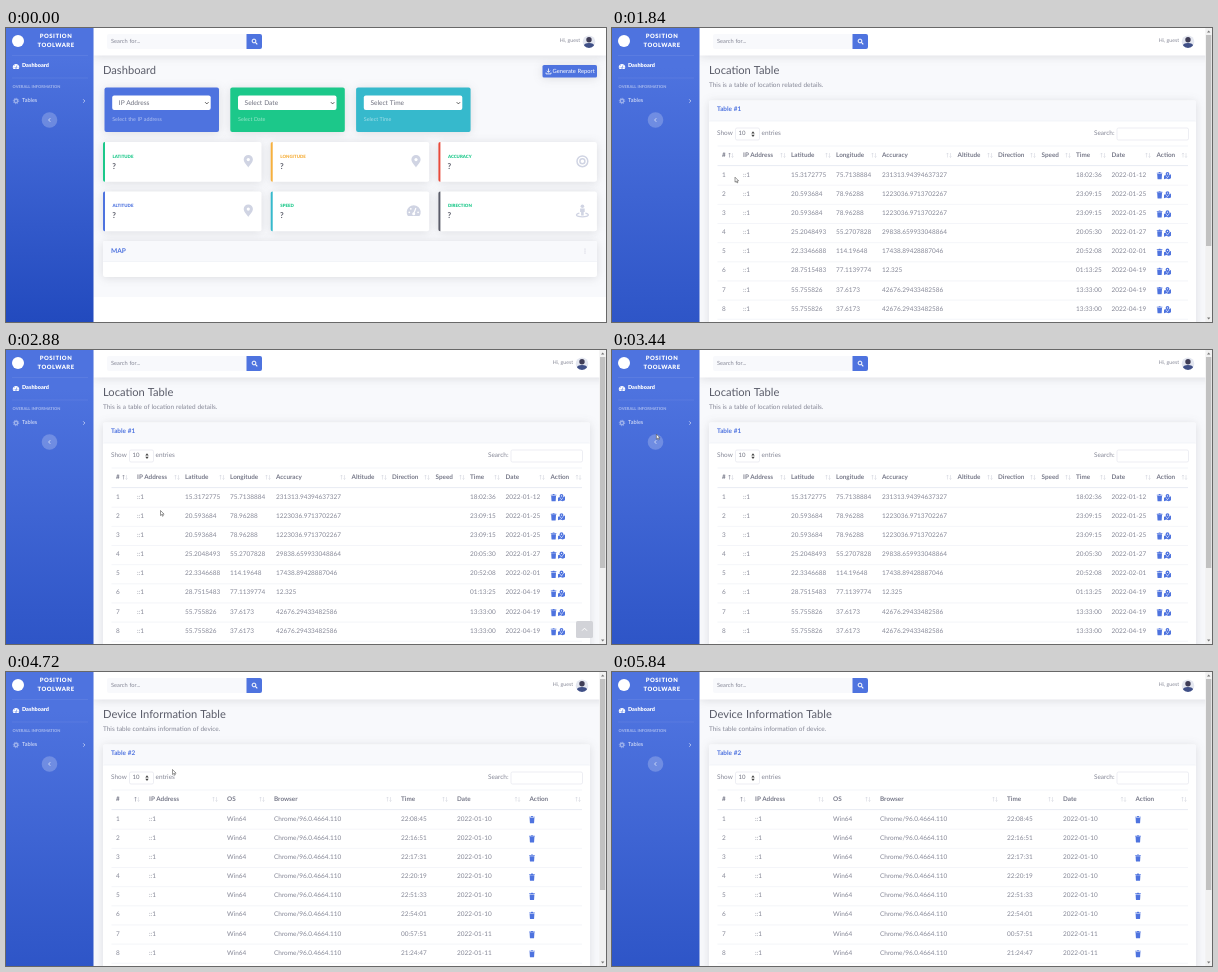
Recreate the animation shown at these times as an HTML page. Size 600 px wide and 294 px high, loop 6.32 s.

```html
<!DOCTYPE html>
<html lang="en">
<head>
<meta charset="utf-8">
<title>Dashboard walkthrough</title>
<style>
html, body { margin: 0; height: 100%; overflow: hidden; background: #f8f9fc; }
#stage { display: block; width: 100vw; height: 100vh; }
text { font-family: Lato, "Open Sans", sans-serif; dominant-baseline: central; word-spacing: .04em; white-space: pre; text-rendering: geometricPrecision; }
.b { font-weight: 700; }
.x { font-weight: 900; }
.card { filter: drop-shadow(0 1px 5px rgba(58, 59, 69, .15)); }
</style>
</head>
<body>
<svg id="stage" viewBox="0 0 600 294"></svg>
<script>
const BLUE = '#4e73df', GREEN = '#1cc88a', CYAN = '#36b9cc', ORANGE = '#f6b03e', RED = '#e74a3b';
const GREY = '#858796', DARK = '#5a5c69', LINE = '#e6e9f2', ICON = '#d0d4e3', PALE = '#f8f9fc';
const LOOP = 6320, STEP = 80, PAGE_H = 390, VIEW_H = 294, SIDE_W = 87.5;

// Drawing helpers
const text = (x, y, s, size = 6.45, fill = GREY, more = '') =>
  `<text x="${x}" y="${y}" dy="-.08em" font-size="${size}" fill="${fill}" ${more}>${s}</text>`;
const bold = (x, y, s, size, fill, more = '') => text(x, y, s, size, fill, 'class="b" ' + more);
const black = (x, y, s, size, fill, more = '') => text(x, y, s, size, fill, 'class="x" ' + more);
const rect = (x, y, w, h, fill, r = 0, more = '') =>
  `<rect x="${x}" y="${y}" width="${w}" height="${h}" fill="${fill}" rx="${r}" ${more}/>`;
const card = (x, y, w, h, fill = '#fff') => rect(x, y, w, h, fill, 2, 'class="card"');
const field = (x, y, w, h) => rect(x, y, w, h, '#fff', 1.5, 'stroke="#d6d8e5" stroke-width=".45"');
const hline = (x1, x2, y, color = LINE, w = .45) =>
  `<path d="M${x1} ${y}H${x2}" stroke="${color}" stroke-width="${w}"/>`;
const stroke = (d, color, w = .9) => `<path d="${d}" fill="none" stroke="${color}" stroke-width="${w}"/>`;
const at = (x, y, body, scale = 1) => `<g transform="translate(${x} ${y}) scale(${scale})">${body}</g>`;
const caret = (x, y, color = '#444', w = .9) => stroke(`M${x - 1.7} ${y - .8}l1.7 1.7l1.7-1.7`, color, w);

// Icons, centred on 0,0
const pin = (c, hole) => `<path fill="${c}" d="M0 6.3C-1.2 4-4.6 1.2-4.6-1.7a4.6 4.6 0 0 1 9.2 0C4.6 1.2 1.2 4 0 6.3z"/><circle cy="-1.7" r="1.6" fill="${hole}"/>`;
const target = `<g fill="none" stroke="${ICON}" stroke-width="1.5"><circle r="5.4"/><circle r="2.5"/></g>`;
const gauge = (c, hole) => `<path fill="${c}" d="M-5.8 5.3A7 7 0 1 1 5.8 5.3z"/>` +
  stroke('M0 3L2.2-2.8', hole, 1.2) + `<g fill="${hole}"><circle cy="3" r="1.5"/><circle cx="-4.4" cy="1.5" r=".9"/><circle cx="4.4" cy="1.5" r=".9"/><circle cx="-2.9" cy="-2" r=".9"/></g>`;
const person = `<g fill="${ICON}"><circle cy="-4.6" r="1.8"/><path d="M-2.3-2.2h4.6v3.4h-1v3.4h-2.6v-3.4h-1z"/></g>` +
  stroke('M-3 2.4C-8 3.5-6.5 6 0 6S8 3.5 3 2.4', ICON, 1.2);
const trash = `<path fill="${BLUE}" d="M-2.8-3h1.7l.4-.6h1.4l.4.6h1.7v.8h-5.6zM-2.4-1.8h4.8l-.3 4.9q0 .5-.6.5h-3q-.6 0-.6-.5z"/>`;
const mapMark = `<path fill="${BLUE}" d="M-3.5 0l1.6-.7 1 1.7.9 1.2.9-1.2 1-1.7 1.6-.7v4l-2.3.9-2.3-.8-2.4.8z"/>` +
  `<path fill="${BLUE}" d="M0 1.5Q-1.9-.7-1.9-1.8a1.9 1.9 0 0 1 3.8 0Q1.9-.7 0 1.5z"/><circle cy="-1.8" r=".6" fill="#fff"/>`;

function sidebar() {
  const rule = y => hline(6, 82, y, 'rgba(255,255,255,.15)');
  return rect(0, 0, SIDE_W, VIEW_H, 'url(#blue)', 0, 'id="side"') +
    '<circle cx="12" cy="13" r="6" fill="#fff"/>' +
    ['POSITION', 'TOOLWARE'].map((s, i) =>
      black(50, 8.8 + 9.6 * i, s, 5.9, '#fff', 'text-anchor="middle" letter-spacing=".5"')).join('') +
    rule(27.5) + at(10, 38.6, gauge('#fff', BLUE), .45) + black(16, 38.8, 'Dashboard', 5.5, '#fff') + rule(50) +
    black(6.5, 59, 'OVERALL INFORMATION', 4, 'rgba(255,255,255,.45)') +
    '<g id="gear" fill="none" stroke="#fff"><circle cx="10" cy="73" r="1.7" stroke-width="1.4"/><circle cx="10" cy="73" r="2.7" stroke-width="1" stroke-dasharray="1.06"/></g>' +
    text(16, 73.4, 'Tables', 5.6, 'rgba(255,255,255,.85)') +
    '<g id="arrow"><path d="M-.8-1.7l1.7 1.7l-1.7 1.7" fill="none" stroke="#fff" stroke-opacity=".7" stroke-width=".8"/></g>' +
    '<svg id="menu" y="84" width="88" height="0">' + rect(6, 0, 75.5, 51, '#fff', 2.2) +
    rect(19, 0, 50, 11, '#eaecf4', 2, 'id="hover"') + black(15.5, 8.6, 'DATA:', 4, '#b7b9cc') +
    ['LOCATION TABLE', 'DEVICE TABLE', 'ERROR TABLE'].map((s, i) =>
      black(25, 16.8 + 11 * i, s, 4.1, '#3a3b45')).join('') + '</svg>' +
    '<g id="toggle"><circle r="7.8" fill="#fff" fill-opacity=".22"/><path d="M.8-1.8l-1.7 1.8l1.7 1.8" fill="none" stroke="#fff" stroke-opacity=".7" stroke-width=".9"/></g>';
}

function topbar() {
  return rect(SIDE_W, 0, 600 - SIDE_W, 27.5, '#fff', 0, 'class="card"') + rect(101, 6, 140, 15, PALE, 2) +
    text(105, 13.7, 'Search for...', 5.7) +
    `<path d="M240.5 6h13.5a2 2 0 0 1 2 2v11a2 2 0 0 1-2 2h-13.5z" fill="${BLUE}"/>` +
    '<circle cx="248" cy="13" r="1.9" fill="none" stroke="#fff"/>' + stroke('M249.4 14.4l1.9 1.9', '#fff', 1.1) +
    '<g id="user">' + text(574, 13.8, 'Hi, guest', 5.2, GREY, 'text-anchor="end"') +
    '<circle cx="583" cy="13.7" r="6.3" fill="#e4e7f0"/><circle cx="583" cy="11.7" r="2.7" fill="#3f3d56"/>' +
    '<path d="M578 17.5q0-2.6 5-2.6t5 2.6a6.3 6.3 0 0 1-10 0z" fill="#3f4f86"/></g>';
}

function dashboard() {
  const picks = [['IP Address', 'Select the IP address', BLUE], ['Select Date', 'Select Date', GREEN], ['Select Time', 'Select Time', CYAN]];
  const marker = pin(ICON, '#fff');
  const infos = [
    ['LATITUDE', GREEN, GREEN, marker], ['LONGITUDE', ORANGE, ORANGE, marker], ['ACCURACY', RED, GREEN, target],
    ['ALTITUDE', BLUE, BLUE, marker], ['SPEED', CYAN, GREEN, gauge(ICON, '#fff')], ['DIRECTION', DARK, GREEN, person]];
  return text(97, 43, 'Dashboard', 11.15, DARK) + rect(536.5, 37, 54.5, 12.5, BLUE, 1.6, 'class="card"') +
    stroke('M542.5 40.5v3.6M540.9 42.7l1.6 1.7l1.6-1.7M540 44.5v1.4h5v-1.4', '#fff', .8) +
    text(546.5, 43.6, 'Generate Report', 5.75, '#fff') +
    picks.map(([label, note, color], i) => at(98.5 + 125.8 * i, 0,
      card(0, 59.5, 114.5, 44.5, color) + rect(7.7, 67.5, 98.5, 14.5, '#fff', 2) +
      text(14.3, 75.2, label, 6.6, '#6e707e') + caret(102.3, 75) +
      text(7.7, 92.6, note, 5.4, 'rgba(255,255,255,.55)'))).join('') +
    infos.map(([label, edge, color, icon], i) => at(97 + 167.7 * (i % 3), i < 3 ? 114 : 163.5,
      card(0, 0, 158.5, 39.8) + `<path d="M2 0h-.2a1.8 1.8 0 0 0-1.8 1.8v36.2a1.8 1.8 0 0 0 1.8 1.8h.2z" fill="${edge}"/>` +
      black(9.5, 14.6, label, 4.4, color) + bold(9.2, 24.2, '?', 8, DARK) +
      at(i % 3 == 2 ? 144 : i == 4 ? 143 : 145.3, 19.3, icon))).join('') +
    card(97, 213, 494, 36) + rect(97, 213, 494, 20.5, PALE, 2) + hline(97, 591, 233.5) +
    bold(105, 223.4, 'MAP', 6.6, BLUE) +
    [221, 223, 225].map(y => `<circle cx="579" cy="${y}" r=".6" fill="#c5c8d6"/>`).join('') +
    rect(SIDE_W, 269, 600 - SIDE_W, 25, '#fff');
}

// cols: [x, title, right edge]; rows: cell strings in column order
function tablePage(title, note, name, cols, rows, tools) {
  const sorter = (x, first) =>
    stroke(`M${x - 1.5} 129.5v-4.5m-1 1.2l1-1.2l1 1.2`, first ? GREY : '#d3d5de', .55) +
    stroke(`M${x + 1.5} 125v4.5m-1-1.2l1 1.2l1-1.2`, '#d3d5de', .55);
  const rowY = i => 147.7 + 19.15 * i;
  return text(97, 43, title, 11.15, DARK) + text(97, 57.8, note) +
    card(97, 72.5, 487, 284) + rect(97, 72.5, 487, 20.5, PALE, 2) + hline(97, 584, 93) +
    bold(105, 82.4, name, 6.4, BLUE) +
    text(105, 106, 'Show') + field(123.5, 100, 24, 12) +
    text(126.5, 106.4, '10', 6, '#6e707e') + '<path d="M139.3 105.5h3.4l-1.7-2.2zM139.3 106.7h3.4l-1.7 2.2z" fill="#444"/>' +
    text(149.5, 106, 'entries') + text(502.5, 106, 'Search:', 6.45, GREY, 'text-anchor="end"') +
    field(505, 100, 71.5, 12) +
    hline(105.5, 576, 118) + hline(105.5, 576, 137.6, LINE, .9) +
    cols.map(([x, s, end], i) => bold(x, 128, s, 6.35, '#777989') + sorter(end, !i)).join('') +
    rows.map((row, i) => row.map((s, c) => text(cols[c][0], rowY(i), s)).join('') +
      tools.map(([x, icon]) => at(x, rowY(i), icon)).join('') + hline(105.5, 576, rowY(i) + 9.5)).join('') +
    text(105, 343, 'Showing 1 to 10 of 20 entries') +
    rect(492, 333.5, 84.5, 15, '#fff', 1.6, 'stroke="#dddfeb" stroke-width=".5"') +
    rect(525.5, 333.5, 13.5, 15, BLUE) +
    text(496.8, 341.2, 'Previous') + text(530.6, 341.2, '1', 6.45, '#fff') +
    text(544, 341.2, '2', 6.45, BLUE) + text(557.3, 341.2, 'Next', 6.45, BLUE) +
    rect(SIDE_W, 376, 600 - SIDE_W, PAGE_H - 376, '#fff');
}

const moscow = ['55.755826', '37.6173', '42676.29433482586', '13:33:00', '2022-04-19'];
const delhi = ['20.593684', '78.96288', '1223036.9713702267', '23:09:15', '2022-01-25'];
const places = [
  ['15.3172775', '75.7138884', '231313.94394637327', '18:02:36', '2022-01-12'], delhi, delhi,
  ['25.2048493', '55.2707828', '29838.659933048864', '20:05:30', '2022-01-27'],
  ['22.3346688', '114.19648', '17438.89428887046', '20:52:08', '2022-02-01'],
  ['28.7515483', '77.1139774', '12.325', '01:13:25', '2022-04-19'], moscow, moscow, moscow, moscow];
const visits = ['22:08:45', '22:16:51', '22:17:31', '22:20:19', '22:51:33', '22:54:01', '00:57:51', '21:24:47', '21:26:10', '21:31:52'];

const locations = tablePage('Location Table', 'This is a table of location related details.', 'Table #1',
  [[110, '#', 119], [131, 'IP Address', 171], [179, 'Latitude', 216], [224, 'Longitude', 262], [270, 'Accuracy', 337],
   [345.5, 'Altitude', 378], [386, 'Direction', 421], [429.5, 'Speed', 456], [464, 'Time', 491], [499.5, 'Date', 536], [544.5, 'Action', 572.5]],
  places.map(([lat, lon, acc, time, date], i) => [i + 1, '::1', lat, lon, acc, '', '', '', time, date]),
  [[547.6, trash], [555.5, mapMark]]);
const devices = tablePage('Device Information Table', 'This table contains information of device.', 'Table #2',
  [[110, '#', 131], [143, 'IP Address', 209], [221, 'OS', 256], [268, 'Browser', 383], [395, 'Time', 439], [451, 'Date', 511.5], [523.5, 'Action', 572]],
  visits.map((time, i) => [i + 1, '::1', 'Win64', 'Chrome/96.0.4664.110', time, i < 6 ? '2022-01-10' : '2022-01-11']),
  [[526, trash]]);

const $ = id => document.getElementById(id);
$('stage').innerHTML =
  `<defs><linearGradient id="blue" x2="0" y2="1"><stop offset=".1" stop-color="${BLUE}"/><stop offset="1" stop-color="#224abe"/></linearGradient></defs>` +
  rect(0, 0, 600, 294, PALE) + '<g id="scroll">' + topbar() +
  [dashboard(), locations, devices].map((p, i) => `<g id="page${i}">${p}</g>`).join('') + sidebar() + '</g>' +
  '<g id="top">' + rect(570, 271, 17, 17, '#d2d3d8', 1.6) + stroke('M576 280.7l2.5-2.5l2.5 2.5', '#fff', 1) + '</g>' +
  '<g id="bar">' + rect(593.3, 0, 6.7, 294, '#f1f1f1') + rect(594, 7, 5.3, 211, '#c1c1c1', 0, 'id="thumb"') +
  '<path d="M595 4.5h3.4l-1.7-2zM595 289.5h3.4l-1.7 2z" fill="#777"/></g>' +
  '<g id="status">' + rect(0, 286.5, 85, 7.5, '#dee1e6', .8) +
  '<text id="link" x="1.5" y="290.3" font-size="4.9" fill="#3c4043" style="font-family:Roboto,sans-serif;word-spacing:0"></text></g>' +
  '<g id="cursor" stroke="#444" stroke-width=".55" fill="#fff" stroke-linejoin="round">' +
  '<path id="pointer" d="M0 0v5l1.2-1l.8 1.8l.8-.4l-.8-1.7h1.6z"/>' +
  '<path id="hand" d="M-.7.4q.7-.9 1.4 0v3l3 .7q.8.3.7 1.2l-.6 3.2h-4l-2.5-3.2q.2-1 1.300-.4l.7.6z"/></g>';

const ramp = (t, a, b) => { const u = Math.min(1, Math.max(0, (t - a) / (b - a))); return u * u * (3 - 2 * u); };
const trail = [
  [720, 180, 130], [960, 24, 70], [1060, 24, 70], [1280, 43, 106.5], [1440, 43, 98], [1600, 43, 98],
  [2000, 166.5, 177], [2480, 166.5, 177], [2840, 154.5, 160.5], [3200, 154.5, 160.5], [3520, 24, 70], [3680, 24, 70],
  [4000, 46, 116], [4320, 46, 116], [4640, 167, 94], [4720, 166.5, 97.5]];

function cursorAt(t) {
  const i = trail.findIndex(k => k[0] > t);
  if (i < 1) return (i ? trail.at(-1) : trail[0]).slice(1);
  const [t0, x0, y0] = trail[i - 1], [t1, x1, y1] = trail[i], u = ramp(t, t0, t1);
  return [x0 + (x1 - x0) * u, y0 + (y1 - y0) * u];
}

const show = (id, on) => $(id).style.display = on ? '' : 'none';
const move = (id, x, y) => $(id).setAttribute('transform', `translate(${x} ${y})`);

function draw(t) {
  const page = t < 1600 ? 0 : t < 4320 ? 1 : 2;
  const open = page == 0 ? ramp(t, 960, 1120) : page == 1 ? ramp(t, 3600, 3760) : 0;
  const down = page == 1 ? ramp(t, 2160, 2380) - ramp(t, 2640, 2840)
    : page == 2 ? ramp(t, 4960, 5120) - ramp(t, 5240, 5400) : 0;
  const offset = down * (PAGE_H - VIEW_H);
  [0, 1, 2].forEach(i => show('page' + i, i == page));
  move('scroll', 0, -offset);
  move('user', page ? -7 : 0, 0);
  $('side').setAttribute('height', page ? PAGE_H : VIEW_H);
  show('bar', page);
  $('thumb').setAttribute('y', 7 + offset * 280 / PAGE_H);
  $('top').style.opacity = page == 1 ? ramp(t, 2240, 2560) - ramp(t, 2880, 3160)
    : page == 2 ? ramp(t, 5040, 5240) - ramp(t, 5440, 5840) : 0;

  $('menu').setAttribute('height', 51 * open);
  show('menu', open > 0);
  move('toggle', 43.5, 92 + 57 * open);
  $('arrow').setAttribute('transform', `translate(78 73) rotate(${open ? 90 : 0})`);
  $('gear').style.opacity = page == 0 && open ? .95 : .45;

  const [x, y] = cursorAt(t), seen = t >= 720 && t < 5480;
  const row = open == 1 && x > 19 && x < 69 ? Math.floor((y - 95) / 11) : -1;
  const onItem = row >= 0 && row < 3, onTables = !offset && x < SIDE_W && y > 66 && y < 80;
  show('hover', onItem);
  $('hover').setAttribute('y', 11 + 11 * row);
  show('status', seen && (onItem || onTables));
  $('link').textContent = 'localhost/position_toolware/guest/' + (onItem ? ['loc', 'dev', 'err'][row] : '#');
  show('cursor', seen);
  show('hand', onItem || onTables);
  show('pointer', !onItem && !onTables);
  move('cursor', x, y);
}

const start = performance.now();
function tick() {
  const t = (performance.now() - start) % LOOP;
  draw(Math.floor(t / STEP) * STEP);
  requestAnimationFrame(tick);
}
tick();
</script>
</body>
</html>
```
